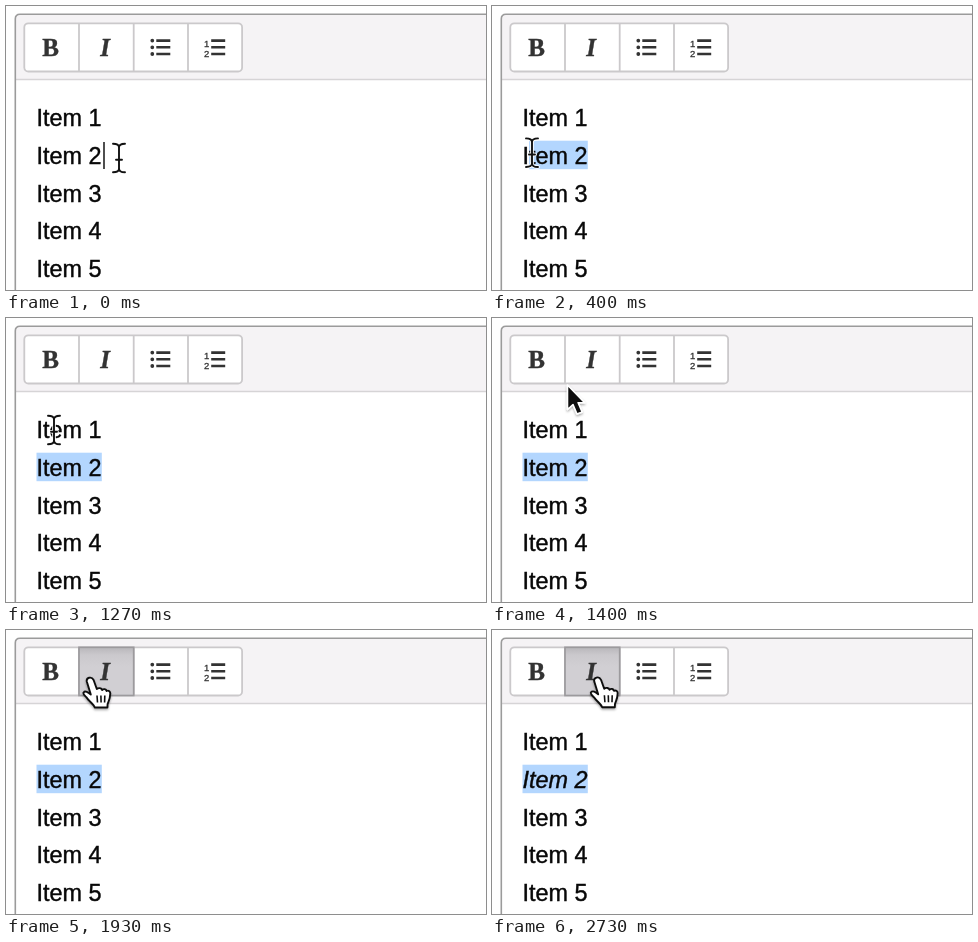
Recreate the animation shown at these times as an HTML page. Size 480 px wide and 284 px high, loop 2790 ms.

```html
<!DOCTYPE html>
<html lang="en">
<head>
<meta charset="utf-8">
<title>Italic button</title>
<style>
  html, body { margin: 0; width: 100%; height: 100%; overflow: hidden; background: #fff; }
  svg { display: block; width: 100%; height: 100%; }
  .items { font: 23.4px "Liberation Sans", Arial, sans-serif; fill: #080808; stroke: #080808; stroke-width: .4; }
  .icon { font: bold 25px "Liberation Serif", serif; fill: #333; stroke: #333; stroke-width: .4; text-anchor: middle; }
  .slanted { font-style: italic; }
  .num { font: 9.5px "Liberation Sans", Arial, sans-serif; fill: #333; stroke: #333; stroke-width: .3; }
</style>
</head>
<body>
<svg viewBox="0 0 480 284">
  <defs>
    <linearGradient id="inset" x2="0" y2="1">
      <stop offset="0" stop-color="#b8b6ba"/>
      <stop offset=".16" stop-color="#cbc9cd"/>
      <stop offset=".4" stop-color="#d1cfd3"/>
    </linearGradient>
    <filter id="shadow" x="-30%" y="-30%" width="160%" height="160%">
      <feDropShadow dx="0" dy="1.5" stdDeviation="1.3" flood-opacity=".35"/>
    </filter>
    <path id="bars" d="M0 34.6h14M0 41.3h14M0 48h14" stroke="#333" stroke-width="2.6"/>
    <path id="beamLine" d="M-6-14.3C-2-14.3 0-13 0-10.5C0-13 2-14.3 6-14.3M0-10.5V10.5M-6 14.3C-2 14.3 0 13 0 10.5C0 13 2 14.3 6 14.3M-3 1.8H3"/>
  </defs>

  <path d="M9.3 74V13q0-4.7 4.7-4.7H480V74z" fill="#f5f3f5"/>
  <path d="M10 73.5H480" stroke="#d6d4d6" stroke-width="1.4"/>
  <path d="M9.3 284V13q0-4.7 4.7-4.7H480" fill="none" stroke="#9b9b9b" stroke-width="1.6"/>

  <rect x="18.3" y="17.3" width="217.8" height="48.2" rx="4" fill="#fff" stroke="#cbc9cb" stroke-width="1.8"/>
  <path d="M73 17V66M127.7 17V66M182 17V66" stroke="#cbc9cb" stroke-width="1.8"/>
  <rect id="button" x="73" y="17.3" width="54.7" height="48.2" stroke-width="1.7"/>
  <text class="icon" x="44.6" y="49.5">B</text>
  <text class="icon slanted" x="99" y="49.5">I</text>
  <use href="#bars" x="150.3"/>
  <path d="M146.3 34.6h0M146.3 41.3h0M146.3 48h0" stroke="#333" stroke-width="3.8" stroke-linecap="round"/>
  <use href="#bars" x="205.2"/>
  <text class="num" x="198" y="40.5">1</text>
  <text class="num" x="198" y="50.5">2</text>

  <rect id="selection" y="134.7" height="28.5" fill="#b3d6fe"/>
  <g class="items" id="items"></g>
  <path id="caret" d="M98 136V163" stroke="#222" stroke-width="1.6"/>

  <g id="beam" fill="none" stroke-linecap="round">
    <use href="#beamLine" stroke="#fff" stroke-width="3.6"/>
    <use href="#beamLine" stroke="#111" stroke-width="1.9"/>
  </g>
  <path id="arrow" d="M0 0V24.5L5.5 19.5L9.5 29L14.6 27L10.6 17.8H17.2Z" fill="#080808" stroke="#fff" stroke-width="1.6" stroke-linejoin="round" filter="url(#shadow)"/>
  <g id="hand" stroke="#111" stroke-width="1.9" stroke-linejoin="round" filter="url(#shadow)">
    <path d="M-4.8 3.5C-5.5-.5 0-2 2 2L5.2 11C7 9.5 10 10 10.5 12C12 10.5 14.5 11 15 13C17 12 19 13.5 18.6 16C18.5 21 17 23 16 26L15.8 29.5H3.2C2 26-3 23-5 19.5C-7 17.5-9 16-8 14.5C-6.5 12.5-3.5 14-.8 16.5Z" fill="#fff"/>
    <path d="M5.4 17.5L5.9 24.5M9.3 17.5L9.5 24.5M13.2 17.5L13 24.5" fill="none" stroke-width="1.6"/>
  </g>
</svg>
<script>
const LOOP = 2790, LEFT = 30.5, RIGHT = 95.8;
const $ = id => document.getElementById(id);
const show = (el, on) => el.setAttribute('visibility', on ? 'visible' : 'hidden');
const set = (el, attrs) => { for (const k in attrs) el.setAttribute(k, attrs[k]); };

$('items').innerHTML = [1, 2, 3, 4, 5].map(n =>
  `<text x="${LEFT}" y="${120.2 + 37.7 * (n - 1)}">Item ${n}</text>`).join('');
const item = $('items').children[1];

// Pointer steps: start time, shape, x, y
const steps = [
  [0, 'beam', 113, 152], [70, 'beam', 104, 151.5], [130, 'beam', 89, 150],
  [200, 'beam', 72, 148.5], [270, 'beam', 54, 147], [400, 'beam', 40, 146.7],
  [530, 'beam', 34.5, 146.7], [600, 'beam', 32, 146.7], [800, 'beam', 28, 146.5],
  [1270, 'beam', 48, 112], [1330, 'arrow', 66, 82], [1400, 'arrow', 75.5, 67],
  [1470, 'hand', 78, 61], [1530, 'hand', 81.3, 56], [1600, 'hand', 83.5, 51.5],
  [1670, 'hand', 85.6, 48], [2670, 'hand', 96, 47.5], [2730, 'hand', 107, 47.8]
];
// Character edges of "Item 2"
const edges = [LEFT, 37, 43.5, 56.5, 76, 82.5, RIGHT];
const nearest = x => edges.reduce((a, b) => Math.abs(b - x) < Math.abs(a - x) ? b : a);

function draw(t) {
  const [, shape, x, y] = steps.findLast(s => s[0] <= t);
  for (const name of ['beam', 'arrow', 'hand']) {
    show($(name), name === shape);
    set($(name), { transform: `translate(${x} ${y})` });
  }
  const start = t < 70 ? RIGHT : t < 600 ? nearest(x) : LEFT;
  set($('selection'), { x: start, width: RIGHT - start });
  show($('caret'), t < 70);
  item.classList.toggle('slanted', t >= 2130);

  const pressed = t >= 1930;
  show($('button'), t >= 1470);
  set($('button'), {
    fill: pressed ? 'url(#inset)' : '#e6e4e6',
    stroke: pressed ? '#9c9a9d' : '#b1afb1'
  });
}

function tick() {
  draw(performance.now() % LOOP);
  requestAnimationFrame(tick);
}
tick();
</script>
</body>
</html>
```
